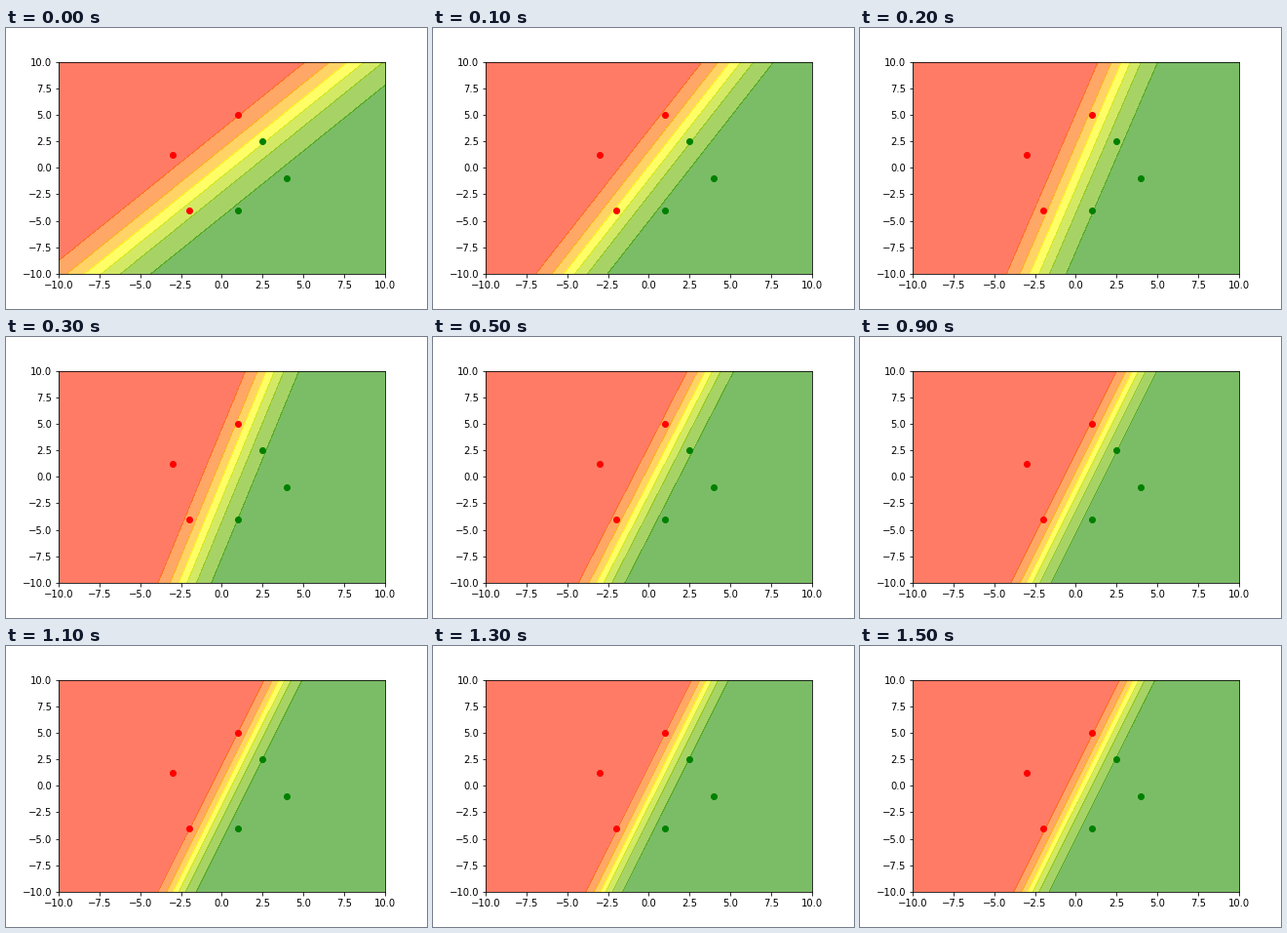
Write a matplotlib script that moves like this. It is 432 by 288 pixels and loops after 1600 ms.

```python
import matplotlib.pyplot as plt
import numpy as np
from matplotlib.animation import ArtistAnimation
from matplotlib.colors import LinearSegmentedColormap

FRAMES = 16
INTERVAL = 100

RED_POINTS = [(-3, 1.25), (-2, -4), (1, 5)]
GREEN_POINTS = [(2.5, 2.5), (1, -4), (4, -1)]


def weights(step):
    """Steepness grows like a logarithm while the tilt swings in and settles."""
    w_x = 0.59 + 0.44 * np.log1p(step)
    swing = 0.482 * np.cos(1.2 * step) + 0.233 * np.sin(1.2 * step)
    tilt = 0.325 + np.exp(-0.75 * step) * swing
    bias = -0.85 * (1 - np.exp(-step / 8))
    return w_x, -w_x * tilt, bias


def probability(step):
    w_x, w_y, bias = weights(step)
    return 1 / (1 + np.exp(-(w_x * xx + w_y * yy + bias)))


fig, ax = plt.subplots(figsize=(6, 4), dpi=72)
fig.subplots_adjust(left=0.125, right=0.9, bottom=0.125, top=0.88)
ax.set(xlim=(-10, 10), ylim=(-10, 10))

axis = np.linspace(-10, 10, 201)
xx, yy = np.meshgrid(axis, axis)
cmap = LinearSegmentedColormap.from_list("traffic", ["red", "yellow", "green"])
levels = np.arange(8) * 0.15

for points, color in ((RED_POINTS, "red"), (GREEN_POINTS, "green")):
    ax.plot(*zip(*points), "o", color=color, zorder=2)

regions = [[ax.contourf(xx, yy, probability(step), levels=levels,
                        cmap=cmap, alpha=0.6, zorder=1)]
           for step in range(FRAMES)]

anim = ArtistAnimation(fig, regions, interval=INTERVAL, repeat=True,
                       repeat_delay=0, blit=False)
plt.show()
```
